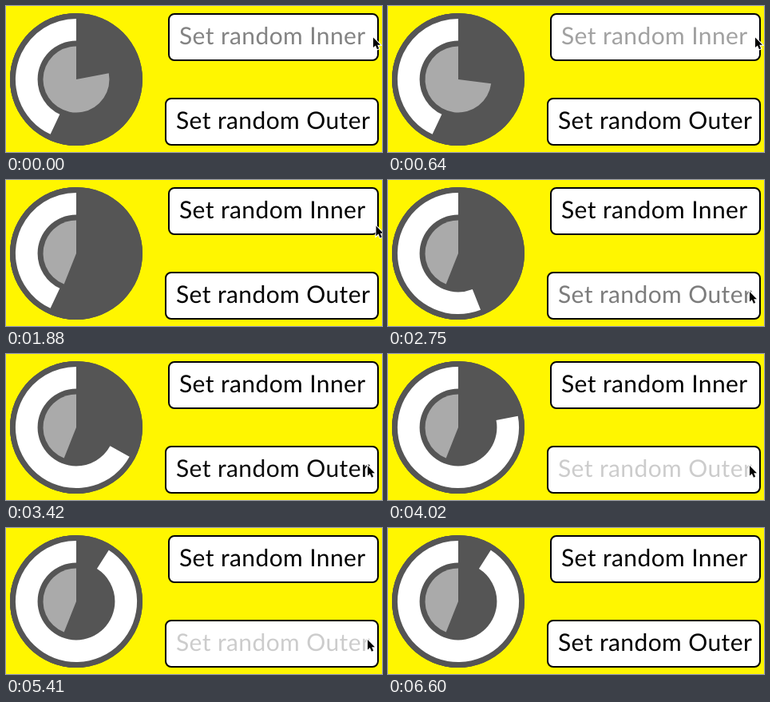
These frames come from a looping animation (471 by 183 pixels, 6960 ms). An HTML page with a canvas:

```html
<!DOCTYPE html>
<html lang="en">
<head>
<meta charset="utf-8">
<title>Random pie</title>
<style>
  html, body { margin: 0; width: 100%; height: 100%; overflow: hidden; background: #fff600; }
  canvas { display: block; }
</style>
</head>
<body>
<canvas width="471" height="183"></canvas>
<script>
const ctx = document.querySelector('canvas').getContext('2d');
const LOOP = 6960, CX = 88, CY = 92;
const UNIT = 83 / 120; // the disc has a radius of 120 units
const DIM = 120, LAG = 60, BRIGHTEN = 250;

// Clicks on each button; the new percentage applies on release
const click = (press, release, percent) => ({ press, release, percent });
const innerClicks = [
  click(-300, -165, 22), click(180, 330, 27), click(560, 700, 32), click(1060, 1340, 56)
];
const outerClicks = [
  click(-900, -700, 57), click(2500, 2580, 44), click(2880, 3150, 33), click(3450, 3570, 15),
  click(3850, 4000, 22), click(4360, 4460, 5), click(4930, 4990, 49), click(5290, 5405, 9)
];

const easeInOut = u => u < .5 ? 2 * u * u : 1 - 2 * (1 - u) ** 2;
const progress = (t, start, duration) =>
  easeInOut(Math.min(1, Math.max(0, (t - start) / duration)));

const percentAt = (clicks, t) => clicks.findLast(c => c.release <= t).percent;

// A label dims while pressed and recovers shortly after release
function opacityAt(clicks, t) {
  const { press, release } = clicks.findLast(c => c.press <= t);
  return 1 - .8 * (progress(t, press, DIM) - progress(t, release + LAG, BRIGHTEN));
}

// Fills clockwise from the given percentage round to the top
function sector(color, percent, outer, inner = 0) {
  const end = 1.5 * Math.PI, start = (percent / 50 - .5) * Math.PI;
  ctx.fillStyle = color;
  ctx.beginPath();
  ctx.arc(CX, CY, outer * UNIT, start, end);
  ctx.arc(CX, CY, inner * UNIT, end, start, true);
  ctx.fill();
}

function button(label, x, y, opacity) {
  ctx.beginPath();
  ctx.roundRect(x, y, 466 - x, 58, 7);
  ctx.fillStyle = '#fff';
  ctx.fill();
  ctx.strokeStyle = '#000';
  ctx.lineWidth = 2;
  ctx.stroke();
  ctx.fillStyle = `rgba(0, 0, 0, ${opacity})`;
  ctx.font = '30px Lato, sans-serif';
  ctx.letterSpacing = '0.4px';
  ctx.textRendering = 'geometricPrecision';
  ctx.fillText(label, x + 13, y + 38);
}

const arrow = new Path2D('M0 0V12.6L2.9 10 5 14.8 7.2 13.8 5.2 9.2H9Z');

function cursor(t) {
  const move = progress(t, 1710, 570), leave = progress(t, 6120, 480);
  ctx.save();
  ctx.translate(460 - 7 * move + 9 * Math.sin(Math.PI * move) + leave,
    39.5 + 100.5 * move + 46 * leave);
  ctx.strokeStyle = '#fff';
  ctx.lineWidth = 2.2;
  ctx.stroke(arrow);
  ctx.fillStyle = '#000';
  ctx.fill(arrow);
  ctx.restore();
}

function draw(t) {
  ctx.fillStyle = '#fff600';
  ctx.fillRect(0, 0, 471, 183);
  sector('#555', -50, 120);
  sector('#555', 50, 120);
  ctx.beginPath();
  ctx.arc(CX, CY, 120 * UNIT, 0, 2 * Math.PI);
  ctx.fill();
  sector('#fff', percentAt(outerClicks, t), 110, 70);
  sector('#aaa', percentAt(innerClicks, t), 60);
  button('Set random Inner', 204, 10, opacityAt(innerClicks, t));
  button('Set random Outer', 200, 116, opacityAt(outerClicks, t));
  cursor(t);
}

const began = performance.now();
function tick() {
  draw((performance.now() - began) % LOOP);
  requestAnimationFrame(tick);
}
tick();
</script>
</body>
</html>
```
